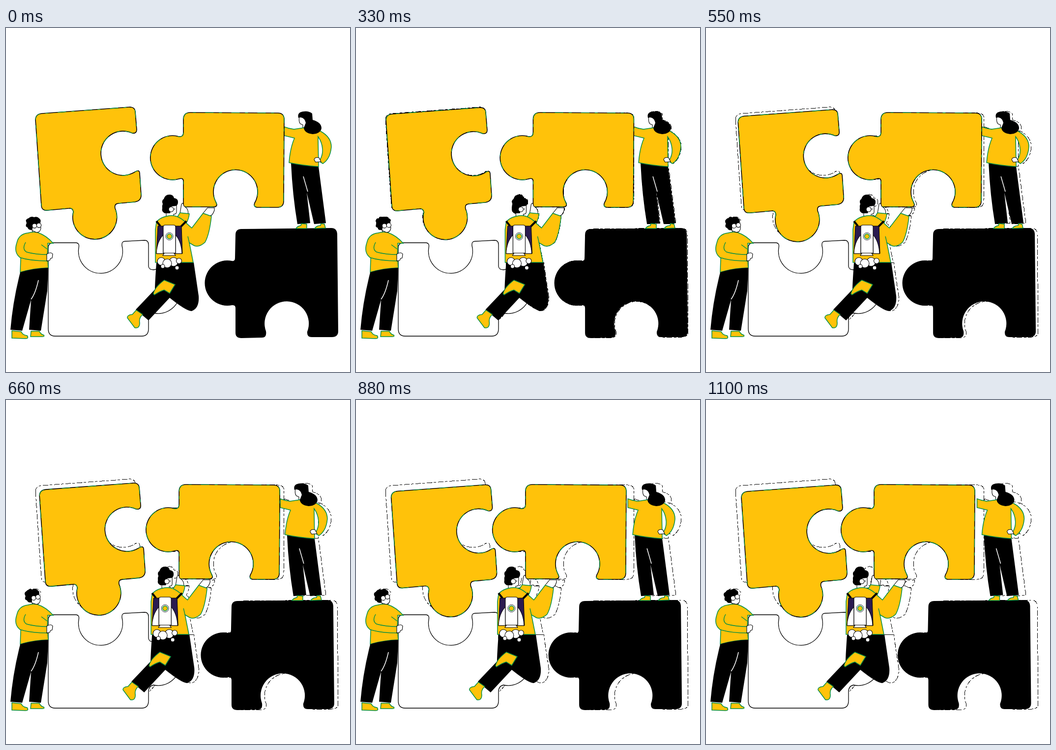
An HTML page for the animation above (1210 ms loop, 700 by 700 pixels).

```html
<!DOCTYPE html>
<html lang="en">
<head>
<meta charset="utf-8">
<title>Puzzle team</title>
<style>
  html, body { margin: 0; width: 100%; height: 100%; overflow: hidden; background: #fff; }
  svg { display: block; width: 100vw; height: 100vh; }
  .gold { fill: #ffc20a; stroke: #000; stroke-width: 1.6; }
  .tint { fill: none; stroke: #00a550; stroke-width: 1.1; stroke-dasharray: 17 11 6 19; }
  .cloth { fill: #ffc20a; stroke: #008f45; stroke-width: 1.5; }
  .seam { fill: none; stroke: #008f45; stroke-width: 1.4; }
  .skin { fill: #fff; stroke: #000; stroke-width: 1.1; }
  .crease { fill: none; stroke: #fff; stroke-width: 1.5; }
  .navy { fill: #2a1b50; stroke: #000; }
  .strap { fill: none; stroke: #000; stroke-width: 4; }
  #trail { fill: none; stroke: #000; stroke-width: 1; stroke-dasharray: 11 3 5 4; shape-rendering: crispEdges; }
</style>
</head>
<body>
<svg viewBox="0 0 700 700">
  <defs>
    <path id="tilted" d="M60 187Q60 175 73 174L250 161Q262 160 263 170L266 207Q266 215 257 214A45 45 0 1 0 262 293Q271 287 272 295L275 340Q275 352 262 354L228 357Q220 358 222 367A45 45 0 1 1 137 374Q136 366 128 367L84 371Q73 372 72 362Z"/>
    <path id="level" d="M361 186Q361 172 375 172L553 173Q566 173 566 186L565 352Q565 365 552 365H511Q503 364 506 356A45 45 0 1 0 427 354Q432 363 424 364H361V312Q361 304 352 307A45 45 0 1 1 352 221Q361 222 361 212Z"/>
    <path id="dark" d="M467 421Q467 409 479 409L662 407Q673 407 674 419L676 617Q676 629 663 629H622Q612 629 613 618A45 45 0 1 0 529 617Q531 630 521 630L479 631Q467 631 467 620V570Q467 563 460 564A46 46 0 1 1 460 474Q466 475 466 468Z"/>
    <path id="blank" d="M86 448Q86 437 96 437H143Q150 438 148 447A45 45 0 1 0 236 443Q235 434 242 434L282 432Q290 432 290 441V485Q291 492 300 492A45 45 0 1 1 300 580Q290 582 290 594V612Q290 627 276 627H100Q86 627 86 612Z"/>

    <path id="curls" d="M42 397Q38 389 46 387Q51 382 57 385Q64 383 67 387Q72 390 70 396L67 399L56 400L52 411Q45 411 44 406Q38 404 42 397Z"/>

    <path id="locks" d="M595 183Q592 172 604 170Q616 168 623 174L624 187Q642 192 642 204Q640 215 624 216Q607 214 606 203L610 193Q608 184 600 181Z"/>
    <path id="blouse" d="M566 201Q576 205 586 206L606 203L640 210Q662 222 662 242Q660 266 645 276L637 271Q645 260 644 246Q643 232 635 221L636 282Q605 280 576 274Q578 245 587 224L566 219Z"/>
    <path id="slacks" d="M580 275L636 282L651 397L627 399L612 335L619 397L593 399Q583 340 580 275Z"/>

    <path id="mop" d="M319 358Q316 351 321 348Q324 338 334 339Q341 340 342 346Q350 347 350 354Q350 360 346 362L337 363L334 377H323Q316 373 318 367Q317 362 319 358Z"/>
    <path id="jumper" d="M306 396Q310 387 327 383Q340 380 349 384L354 376L373 378Q372 388 367 397L378 407L401 377L418 383Q414 420 405 436Q393 447 383 443L373 437L381 477H304V410Z"/>
    <path id="jeans" d="M306 478L382 477L392 545Q394 570 378 576Q368 577 333 549L290 595L264 573L303 532Q303 520 306 478Z"/>
    <g id="hands">
      <path d="M354 377L357 359Q360 353 362 362L368 367Q372 374 370 379Z"/>
      <path d="M401 377L410 366H424V371Q420 383 414 382Z"/>
    </g>
  </defs>

  <g id="trail">
    <use href="#tilted"/><use href="#level"/><use href="#dark"/><use href="#curls"/>
    <use href="#locks"/><use href="#blouse"/><use href="#slacks"/>
    <use href="#mop"/><use href="#jumper"/><use href="#jeans"/><use href="#hands"/>
  </g>

  <g id="left">
    <use href="#tilted" class="gold"/><use href="#tilted" class="tint"/>
  </g>

  <use href="#blank" fill="#fff" stroke="#000" stroke-width="1.3"/>

  <!-- man pushing the blank piece -->
  <g>
    <path class="skin" d="M53 408L54 418H65L66 412Z"/>
    <path class="cloth" d="M45 417Q26 419 22 437Q15 458 30 468L29 497Q55 489 86 488L84 461L85 449V438H96Q82 422 64 416Q55 414 45 417Z"/>
    <path class="seam" d="M40 436Q32 450 42 456Q60 461 84 461M28 467Q50 474 84 474M72 441L84 450"/>
    <path class="skin" d="M83 460Q92 455 95 460L94 468Q90 468 89 473L83 474Z"/>
    <path d="M29 497Q55 489 86 488L84 535L71 616L47 614L51 553L33 616L9 614Q14 555 29 497Z"/>
    <path class="crease" d="M66 513Q60 540 51 552"/>
    <path class="cloth" d="M12 616L31 618Q34 625 43 626Q47 632 40 632L12 631ZM51 617H68Q70 623 77 625Q79 628 74 628H50Z"/>
    <g id="head">
      <path class="skin" d="M54 398L69 396L71 407Q70 416 62 416L53 412Z"/>
      <use href="#curls"/>
      <circle class="skin" cx="58" cy="402.500" r="4.600"/>
      <circle class="skin" cx="67" cy="401.500" r="4.600"/>
    </g>
  </g>

  <g id="right">
    <use href="#dark"/>
    <path class="skin" d="M597 181Q595 190 599 195L604 197V206H612V184Z"/>
    <use href="#slacks"/>
    <path class="crease" d="M605 302L614 333"/>
    <use href="#blouse" class="cloth"/>
    <path class="skin" d="M627 268Q628 262 637 264L641 272L630 273Z"/>
    <use href="#locks"/>
    <path class="cloth" d="M590 408Q593 403 600 402L601 398L612 399V408ZM628 408Q632 402 640 402L641 398L648 399L650 407Z"/>
  </g>

  <!-- flying man carrying the level piece -->
  <g id="middle">
    <use href="#level" class="gold"/><use href="#level" class="tint"/>
    <use href="#hands" class="skin"/>
    <path class="skin" d="M326 374V386H341V379Q347 379 347 374V359H334Z"/>
    <use href="#jeans"/>
    <use href="#jumper" class="cloth"/>
    <path class="seam" d="M349 384Q360 389 367 397M373 437L370 424"/>
    <use href="#mop"/>
    <circle class="skin" cx="336" cy="369" r="5"/>
    <path d="M343 367V370" stroke="#000"/>
    <path class="strap" d="M306 393L314 403M367 393L356 404"/>
    <path class="navy" d="M309 403H357L359 459H306Z"/>
    <path class="skin" d="M320 421Q307 435 306 459H320ZM345 421Q357 435 358 459H345Z"/>
    <path class="skin" d="M323 457H341L345 463H319Z"/>
    <path class="skin" d="M320 405Q320 401 324 401H341Q345 401 345 405V458H320Z"/>
    <circle cx="332.500" cy="424" r="7.500" fill="#fff" stroke="#223"/>
    <circle class="cloth" cx="332.500" cy="424" r="5"/>
    <g class="skin">
      <circle cx="316" cy="475" r="8"/><circle cx="341" cy="476" r="9"/>
      <circle cx="328" cy="479" r="9"/><circle cx="352" cy="474" r="5.500"/>
      <circle cx="319" cy="485" r="4"/><circle cx="348" cy="488" r="4"/>
    </g>
    <path class="cloth" d="M300 541Q302 528 322 513L344 522L333 540L322 533Q312 536 302 543ZM265 574L278 583Q270 590 272 600Q272 612 262 610L247 590Q246 584 257 583Z"/>
  </g>
</svg>
<script>
const STEP = 110, STEPS = 11;
const part = id => document.getElementById(id);
const move = (id, x, y = 0) => part(id).setAttribute("transform", `translate(${x} ${y})`);

// quadratic ease in and out over a span of steps
function ease(step, start, length) {
  const u = Math.min(1, Math.max(0, (step - start) / length));
  return u < 0.5 ? 2 * u * u : 1 - 2 * (1 - u) ** 2;
}

function draw(now) {
  const step = Math.floor(now / STEP) % STEPS;
  const near = ease(step, 1.5, 7.5), side = ease(step, 1.5, 8.5), far = ease(step, 2, 8.3);
  move("left", 12 * near, 12 * near);
  move("right", -14.5 * side);
  move("middle", -19 * far);
  part("head").setAttribute("transform", `rotate(${-11.5 * side} 60 418)`);
  part("trail").setAttribute("visibility", step > 2 ? "visible" : "hidden");
}

const origin = performance.now();
function tick() {
  draw(performance.now() - origin);
  requestAnimationFrame(tick);
}
tick();
</script>
</body>
</html>
```
